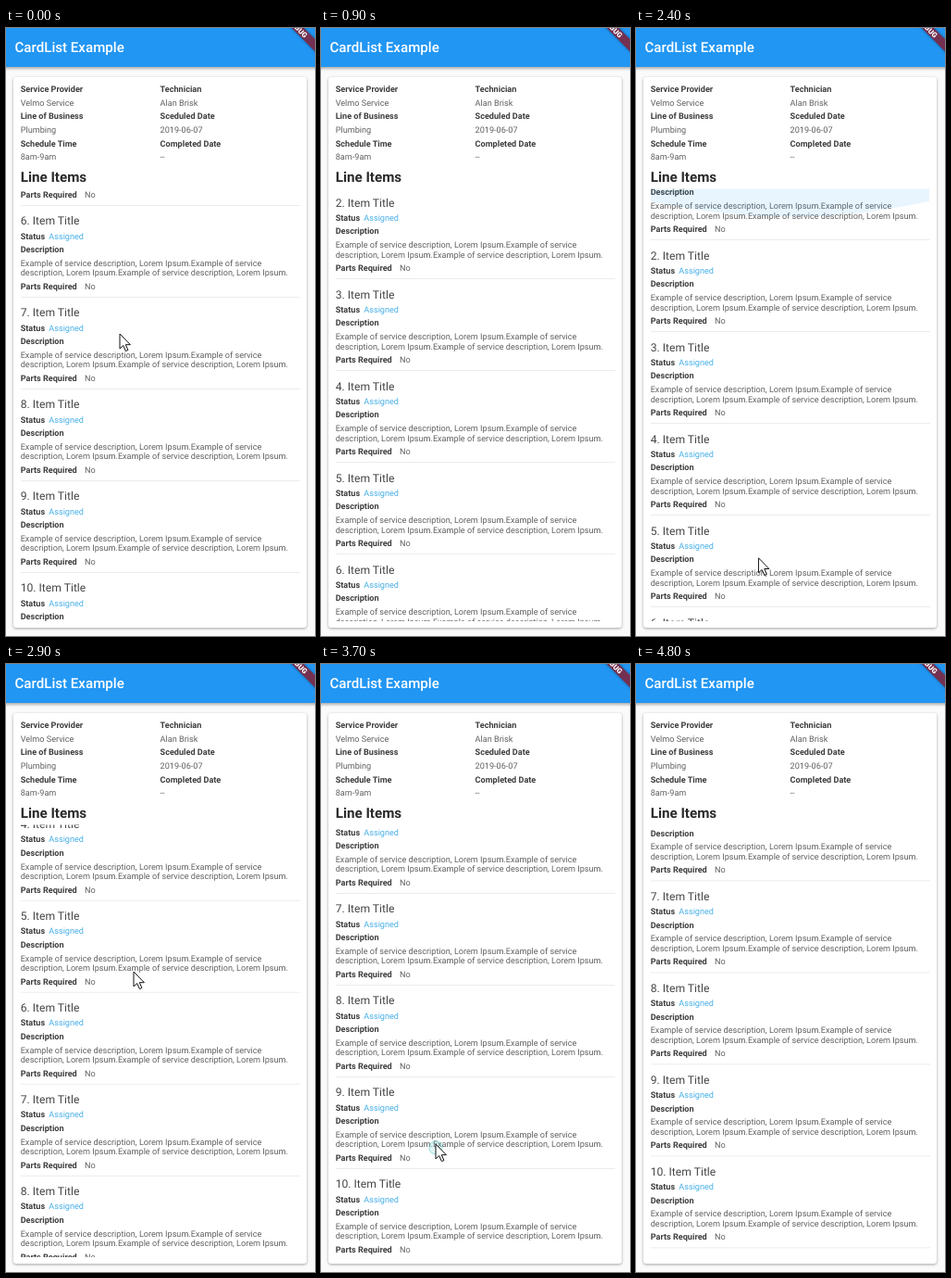
Animation, 334 px wide and 656 px high, one loop 6.9 s. Source, as an HTML page:

```html
<!DOCTYPE html>
<html lang="en">
<head>
<meta charset="utf-8">
<title>CardList Example</title>
<style>
  html, body { margin: 0; width: 100%; height: 100%; overflow: hidden; background: #fafafa; }
  svg { display: block; width: 334px; height: 656px; font-family: Roboto, sans-serif; text-rendering: geometricPrecision; }
  text { font-size: 9.12px; fill: #606060; }
  .label { font-weight: 700; fill: #3c3c3c; }
  .title { font-size: 12.15px; fill: #464646; }
  .link { fill: #46aee8; }
  .head { font-size: 15.2px; font-weight: 700; fill: #2a2a2a; }
  .bar { font-size: 15.1px; font-weight: 500; fill: #fff; }
  .tag { font-size: 7.8px; font-weight: 900; fill: #fff; text-anchor: middle; }
</style>
</head>
<body>
<svg viewBox="0 0 334 656">
  <defs>
    <clipPath id="view"><rect x="8" y="173.5" width="317" height="466.5"/></clipPath>
    <filter id="soft" x="-10%" y="-30%" width="120%" height="160%"><feGaussianBlur stdDeviation="1.6"/></filter>
  </defs>
  <rect width="334" height="656" fill="#fafafa"/>
  <rect x="-5" y="4" width="344" height="40" fill="#000" opacity=".3" filter="url(#soft)"/>
  <rect width="334" height="42" fill="#2196f3"/>
  <text class="bar" x="9.5" y="26.4">CardList Example</text>
  <g transform="translate(334 -18) rotate(45)">
    <rect x="-40" y="21.3" width="80" height="9.2" opacity=".4" filter="url(#soft)"/>
    <rect x="-40" y="21.3" width="80" height="9.2" fill="#743050"/>
    <text class="tag" x="0" y="28.7">DEBUG</text>
  </g>
  <rect x="8" y="54" width="317" height="594" rx="3" fill="#000" opacity=".35" filter="url(#soft)"/>
  <rect x="8" y="53" width="317" height="594" rx="3" fill="#fff"/>
  <g id="info"></g>
  <text class="head" x="15.7" y="165.6">Line Items</text>
  <g clip-path="url(#view)">
    <g id="list"></g>
    <path id="topGlow" fill="#2196f3" d="M16 173H317V187Q166 220 16 187Z"/>
    <path id="endGlow" fill="#2196f3" d="M16 640H317V626Q166 593 16 626Z"/>
  </g>
  <g id="ripple" fill="none" stroke="#3cc3c6" stroke-width="2">
    <circle id="outer"/>
    <circle id="inner" opacity=".55"/>
    <circle id="dot" fill="#3cc3c6" stroke="none"/>
  </g>
  <path id="cursor" d="M0 0V16L3.7 12.6L6.4 18.6L8.9 17.5L6.3 11.7H11.4Z" fill="#fff" stroke="#111" stroke-linejoin="round"/>
</svg>
<script>
const $ = id => document.getElementById(id);
const LOOP = 6900, STEP = 100, PITCH = 99, LEFT = 15.7;

function add(parent, tag, attrs, content = "") {
  const el = document.createElementNS("http://www.w3.org/2000/svg", tag);
  for (const k in attrs) el.setAttribute(k, attrs[k]);
  el.textContent = content;
  parent.append(el);
  return el;
}
const put = (parent, x, y, content, cls = "") => add(parent, "text", { x, y, class: cls }, content);

const info = [
  ["Service Provider", "Velmo Service", "Technician", "Alan Brisk"],
  ["Line of Business", "Plumbing", "Sceduled Date", "2019-06-07"],
  ["Schedule Time", "8am-9am", "Completed Date", "--"]
];
info.forEach((row, i) => row.forEach((content, j) => {
  const isValue = j % 2;
  put($("info"), j < 2 ? LEFT : 166.6, 68.9 + i * 29.3 + isValue * 14.6, content, isValue ? "" : "label");
}));

// Row positions are relative to the middle of the item title.
function addItem(n) {
  const g = add($("list"), "g", { transform: `translate(0 ${(n - 1) * PITCH})` });
  put(g, LEFT, 4.4, `${n}. Item Title`, "title");
  put(g, LEFT, 19.7, "Status", "label");
  put(g, 46.3, 19.7, "Assigned", "link");
  put(g, LEFT, 34.3, "Description", "label");
  put(g, LEFT, 48.9, "Example of service description, Lorem Ipsum.Example of service");
  put(g, LEFT, 59.4, "description, Lorem Ipsum.Example of service description, Lorem Ipsum.");
  put(g, LEFT, 73.8, "Parts Required", "label");
  put(g, 85, 73.8, "No");
  add(g, "rect", { x: 16, y: 82, width: 302, height: 0.8, fill: "#e8e8e8" });
}
for (let n = 1; n <= 10; n++) addItem(n);

const progress = (t, from, to) => Math.min(1, Math.max(0, (t - from) / (to - from)));
const smooth = p => p * p * (3 - 2 * p);
// A drag picks up speed, then the list coasts to rest.
const fling = p => 1 - Math.pow(1 - Math.pow(p, 1.97), 3.6);
const bump = (t, from, to) => Math.sin(Math.PI * progress(t, from, to));

// [start, end, scroll offset reached]
const flings = [[0, 600, 101], [800, 1300, 30], [1400, 1700, 0], [2200, 3700, 510], [3700, 3900, 523.5]];
// [start, end, x reached, y reached]
const glides = [[100, 500, 130, 600], [1200, 1400, 135, 333], [1500, 1700, 132, 591],
  [2300, 2900, 138, 332], [3300, 3600, 124, 518], [3700, 4200, 151, 262]];
// [start, x, y]
const presses = [[100, 123, 331], [1500, 135, 333], [3670, 124, 522]];

const scrollAt = t => flings.reduce((v, [from, to, end]) =>
  v + (end - v) * fling(progress(t, from, to)), 467);

const pointerAt = t => glides.reduce(([x, y], [from, to, endX, endY]) => {
  const p = smooth(progress(t, from, to));
  return [x + (endX - x) * p, y + (endY - y) * p];
}, [123, 330]);

function drawRipple(t) {
  const press = presses.find(([start]) => t >= start && t < start + 400);
  $("ripple").style.display = press ? "" : "none";
  if (!press) return;
  const [start, x, y] = press;
  const p = progress(t, start, start + 400);
  const grow = Math.min(1, 0.2 + p * 1.8);
  $("ripple").setAttribute("transform", `translate(${x} ${y})`);
  $("ripple").setAttribute("opacity", Math.min(1, 0.2 + p * 2, 2 - p * 2));
  $("outer").setAttribute("r", 20.3 * grow);
  $("inner").setAttribute("r", 12 * grow);
  $("dot").setAttribute("r", 5.2 * grow);
}

function draw(t) {
  $("list").setAttribute("transform", `translate(0 ${180 - scrollAt(t)})`);
  $("topGlow").setAttribute("opacity", 0.15 * bump(t, 1700, 2600));
  $("endGlow").setAttribute("opacity", 0.13 * bump(t, 3800, 4400));
  const shown = t <= 500 || (t >= 1500 && t < 4800);
  $("cursor").style.display = shown ? "" : "none";
  $("cursor").setAttribute("transform", `translate(${pointerAt(t)})`);
  drawRipple(t);
}

const begin = performance.now();
function tick() {
  const t = (performance.now() - begin) % LOOP;
  draw(Math.floor(t / STEP) * STEP);
  requestAnimationFrame(tick);
}
tick();
</script>
</body>
</html>
```
